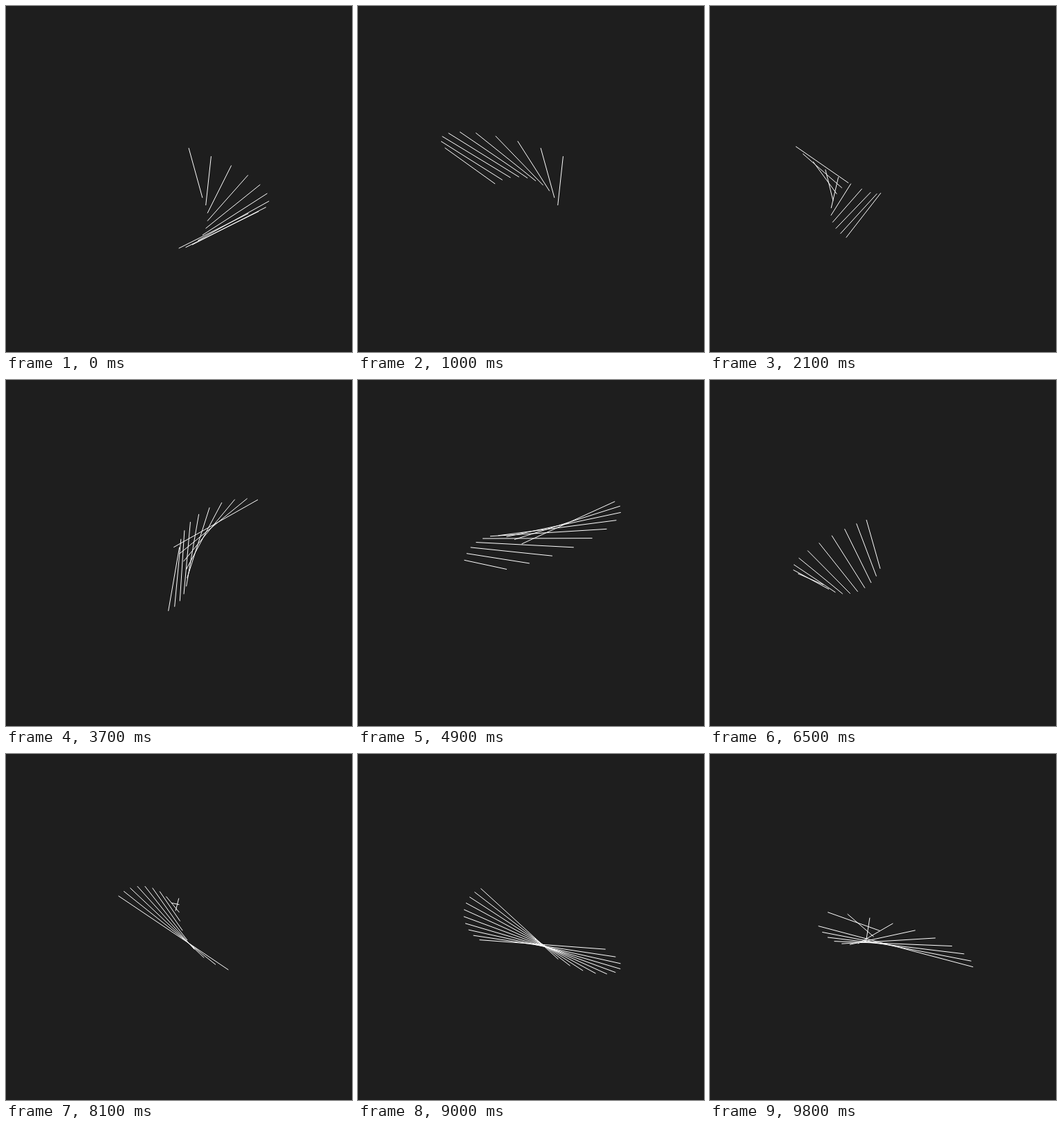
An HTML page with a canvas that plays this animation: 500x500 px, repeating every 9900 ms.

```html
<!DOCTYPE html>
<html lang="en">
<head>
<meta charset="utf-8">
<title>Parametric lines</title>
<style>
  html, body { margin: 0; width: 100%; height: 100%; overflow: hidden; background: #1e1e1e; }
  canvas { display: block; width: 500px; height: 500px; }
</style>
</head>
<body>
<canvas id="stage" width="500" height="500"></canvas>
<script>
const ctx = document.getElementById('stage').getContext('2d');
const { sin, cos } = Math;

const STEP_MS = 100;
const STEPS = 99;
const SPEED = 0.8;
const LINES = 10;

const head = t => [
  100 * cos(t / 6) + 50 * sin(t / 3),
  50 * cos(t / 4) - 30 * sin(t / 20)
];
const tail = t => [
  100 * sin(t / 10) * cos(t / 8),
  100 * cos(t / 10) * cos(t / 8)
];

function draw(step) {
  ctx.setTransform(1, 0, 0, 1, 0, 0);
  ctx.fillStyle = '#1e1e1e';
  ctx.fillRect(0, 0, 500, 500);
  ctx.translate(250, 250);
  ctx.strokeStyle = '#fff';
  ctx.lineWidth = 1;
  ctx.lineCap = 'round';
  for (let i = 0; i < LINES; i++) {
    const t = step * SPEED + i;
    ctx.beginPath();
    ctx.moveTo(...head(t));
    ctx.lineTo(...tail(t));
    ctx.stroke();
  }
}

const start = performance.now();
function tick() {
  const elapsed = performance.now() - start;
  draw(Math.floor(elapsed / STEP_MS) % STEPS);
  requestAnimationFrame(tick);
}
tick();
</script>
</body>
</html>
```
